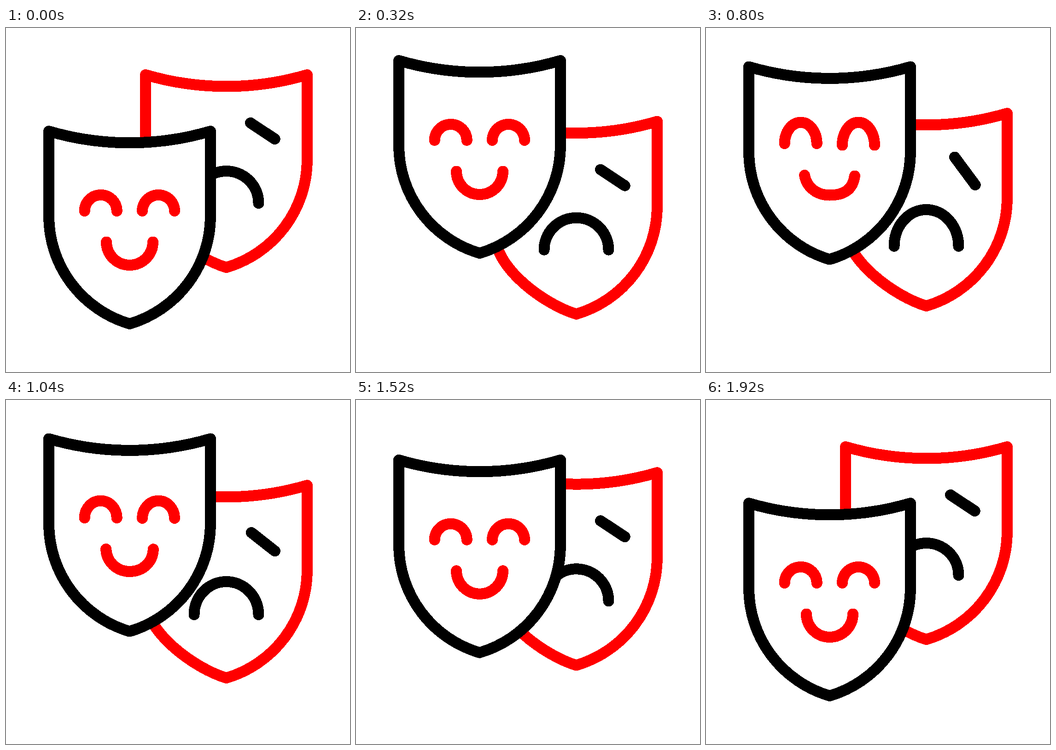
An HTML page for the animation above (2 s loop, 747 by 750 pixels).

```html
<!DOCTYPE html>
<html lang="en">
<head>
<meta charset="utf-8">
<title>Theatre masks</title>
<style>
html, body { margin: 0; width: 100%; height: 100%; overflow: hidden; background: #fff; }
svg { display: block; width: 100%; height: 100%; }
path { fill: none; stroke-width: 24; stroke-linecap: round; stroke-linejoin: round; shape-rendering: crispEdges; }
.black { stroke: #000; }
.red { stroke: #f00; }
.solid { fill: #fff; }
</style>
</head>
<body>
<svg viewBox="0 0 747 750">
  <g id="sad">
    <path class="red solid" id="sadFace"/>
    <path class="black" id="brow"/>
    <path class="black" id="frown"/>
  </g>
  <g id="happy">
    <path class="black solid" id="happyFace"/>
    <path class="red" id="eyeL"/>
    <path class="red" id="eyeR"/>
    <path class="red" id="smile"/>
  </g>
</svg>
<script>
const LOOP = 2000, STEP = 40;
const HALF = 175.5, SIDE = 185, HEIGHT = 420;
const el = id => document.getElementById(id);
const shape = (id, d) => el(id).setAttribute('d', d);
const move = (id, y) => el(id).setAttribute('transform', `translate(0 ${y})`);

// Smooth 0 to 1 between times a and b
function ease(t, a, b) {
  const u = Math.min(1, Math.max(0, (t - a) / (b - a)));
  return u * u * (3 - 2 * u);
}

// Out past the resting offset, settle, then back home
const swing = (t, peak, rest) =>
  peak * ease(t, 0, 320) + (rest - peak) * ease(t, 320, 560) - rest * ease(t, 1320, 1840);

// Shield from its top corners to its tip; left is the edge from tip to left side
const shield = (cx, y, left) =>
  `M${cx - HALF} ${y}A620 620 0 0 0 ${cx + HALF} ${y}v${SIDE}` +
  `A245 245 0 0 1 ${cx} ${y + HEIGHT}${left}Z`;

// Half ellipse opening downwards
const arch = (cx, rx, top, base) =>
  `M${cx - rx} ${base}A${rx} ${base - top} 0 0 1 ${cx + rx} ${base}`;

// Mouth that widens and lifts with k, its right corner fuller than the left
function grin(k) {
  const cx = 268.5, r = 50.5, bottom = 517 - 12.7 * k;
  const w = r + 4.2 * k, yL = 466.5 - 5.3 * k, yR = 466.5 - 3.7 * k;
  const a = 0.552, b = a + 0.09 * k;
  return `M${cx - w} ${yL}` +
    `C${cx - r} ${yL + a * (bottom - yL)} ${cx - a * w} ${bottom} ${cx} ${bottom}` +
    `C${cx + b * w} ${bottom} ${cx + r} ${yR + b * (bottom - yR)} ${cx + w} ${yR}`;
}

function draw(t) {
  const k = ease(t, 560, 840) - ease(t, 840, 1120);
  const eyeTop = 364 - 18.8 * k;

  move('happy', swing(t, -154, -140.5));
  move('sad', swing(t, 101.7, 84));

  shape('eyeL', arch(205.7, 35, eyeTop, 399 - 6.9 * k));
  shape('eyeR', arch(331, 35, eyeTop, 399 - 3.2 * k));
  shape('smile', grin(k));
  shape('frown', arch(478.5, 70, 312, 382 + 10.3 * k));
  shape('brow', `M${531 + 9.5 * k} ${207 - 10 * k}L${583.7 + k} ${242 + 17 * k}`);
}

shape('happyFace', shield(268.5, 225, `a245 245 0 0 1 ${-HALF} ${SIDE - HEIGHT}`));
shape('sadFace', shield(478.5, 102, `c-70 -21 ${-HALF} -100 ${-HALF} -170`));

const start = performance.now();
function tick() {
  const t = (performance.now() - start) % LOOP;
  draw(Math.floor(t / STEP) * STEP);
  requestAnimationFrame(tick);
}
tick();
</script>
</body>
</html>
```
